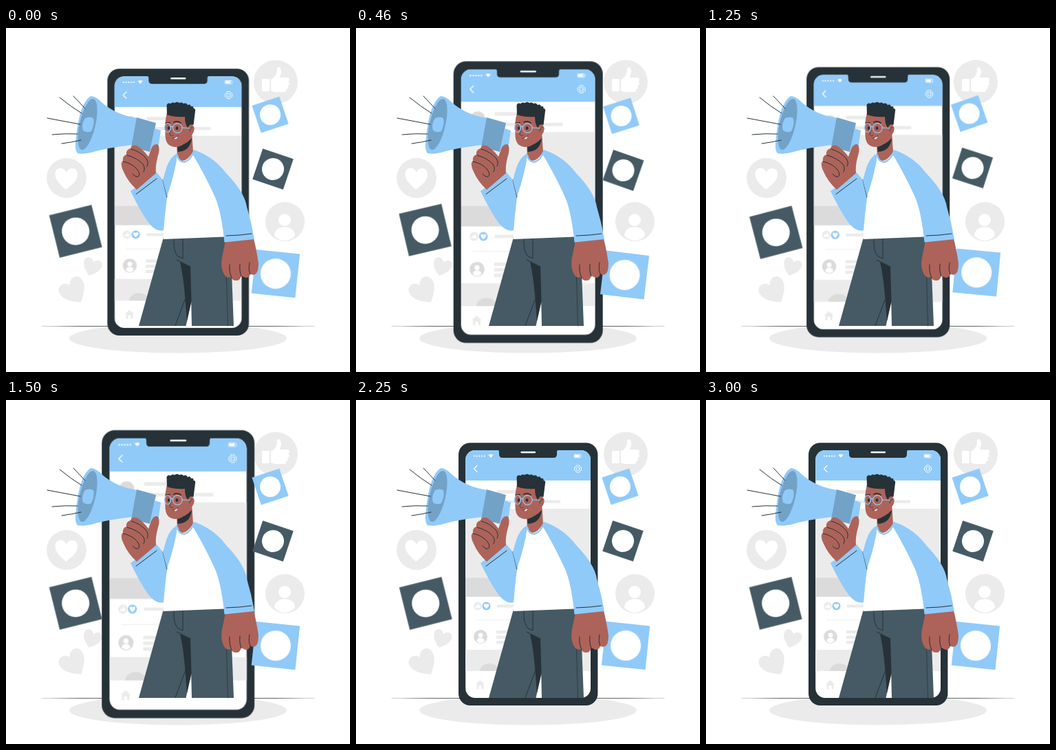
Recreate the animation shown at these times as an HTML page. Size 500 px wide and 500 px high, loop 3040 ms.

```html
<!DOCTYPE html>
<html lang="en">
<head>
<meta charset="utf-8">
<title>Social promotion</title>
<style>
  html, body { margin: 0; width: 100%; height: 100%; overflow: hidden; background: #fff; }
  svg { display: block; width: 100%; height: 100%; }
  .blue { fill: #90caf9; }
  .shade { fill: #73a2c7; }
  .slate { fill: #455a64; }
  .dark { fill: #263238; }
  .pale { fill: #ebebeb; }
  .mid { fill: #dbdbdb; }
  .white { fill: #fff; }
  .skin { fill: #ad6359; }
  .ink, .thin, .out, .trim { fill: none; stroke: #263238; stroke-linecap: round; stroke-linejoin: round; }
  .ink { stroke-width: 1; }
  .thin { stroke-width: .7; }
  .out { stroke: #fff; stroke-width: 1.3; }
  .trim { stroke: #90caf9; stroke-width: 1.2; }
  #phone { transform-origin: 250.2px 253px; animation: pulse 3040ms linear infinite; }
  #tiles { transform-origin: 244.7px 245.5px; animation: sway 3040ms linear infinite; }
  @keyframes pulse {
    0% { transform: scale(1.0157); }
    9.7% { transform: scale(1.1); }
    29.4% { transform: scale(1); }
    38.1% { transform: scale(1); }
    49% { transform: scale(1.1); }
    58.9%, 100% { transform: scale(1); }
  }
  @keyframes sway {
    0% { transform: rotate(.03deg); }
    12% { transform: rotate(1deg); }
    36.7% { transform: rotate(-1deg); }
    61.3% { transform: rotate(1deg); }
    86% { transform: rotate(-1deg); }
    100% { transform: rotate(.13deg); }
  }
</style>
</head>
<body>
<svg viewBox="0 0 500 500">
  <defs>
    <path id="heart" d="M0 10C-5 6-11 1-11-5C-11-12-3-13 0-7C3-13 11-12 11-5C11 1 5 6 0 10Z"/>
    <g id="thumb">
      <rect x="-20" y="-3" width="11" height="18" rx="1"/>
      <path d="M-7-2C-1-5 2-11 2-17C2-22 8-21 8-14C8-10 6-7 6-5H16C21-5 21 0 18 1C21 3 20 7 17 7C19 9 18 12 15 12C16 15 14 16 11 16H-2L-7 14Z"/>
    </g>
    <g id="person">
      <circle cy="-3" r="9"/>
      <path d="M-15 20C-15 3 15 3 15 20Q8 27 0 27T-15 20Z"/>
    </g>
    <clipPath id="screen"><rect x="159.2" y="73" width="181.800" height="360" rx="14"/></clipPath>
  </defs>

  <!-- backdrop -->
  <g class="pale">
    <ellipse cx="250" cy="451" rx="158" ry="21.500"/>
    <circle cx="392" cy="78.500" r="32"/>
    <circle cx="88" cy="218" r="29"/>
    <circle cx="405.500" cy="281.500" r="28.500"/>
    <use href="#heart" transform="translate(124.500 348.500) rotate(18) scale(1.22)"/>
    <use href="#heart" transform="translate(99.500 384) rotate(-33) scale(1.75)"/>
  </g>
  <g class="white">
    <use href="#thumb" transform="translate(392 77)"/>
    <use href="#heart" transform="translate(87.500 220) rotate(2) scale(1.48)"/>
    <use href="#person" x="405" y="282"/>
  </g>
  <ellipse class="dark" cx="250" cy="433.400" rx="200" ry=".45"/>

  <g id="phone">
    <rect class="dark" x="149" y="62.200" width="202.400" height="381.800" rx="17"/>
    <g clip-path="url(#screen)">
      <rect class="white" x="159" y="73" width="183" height="360"/>
      <rect class="blue" x="159" y="73" width="183" height="44"/>
      <g class="pale">
        <rect x="205" y="131" width="42" height="5"/>
        <rect x="205" y="145.500" width="92" height="4.500"/>
        <rect x="159" y="158" width="183" height="101"/>
        <rect x="205" y="297.500" width="45" height="4"/>
        <rect x="175" y="319.500" width="150" height=".8"/>
        <rect x="204" y="335" width="60" height="4.500"/>
        <rect x="204" y="342.500" width="60" height="4.500"/>
        <rect x="204" y="350" width="60" height="4.500"/>
        <rect x="159" y="363" width="183" height="31"/>
        <circle cx="177" cy="299.500" r="6"/>
        <path d="M174 413L180.500 407L187 413H185.500V420H182.500V415H178.500V420H175.500V413Z"/>
      </g>
      <g class="mid">
        <circle cx="182" cy="140" r="10"/>
        <rect x="159" y="258.500" width="183" height="27.500"/>
        <circle cx="181" cy="344" r="10"/>
        <path d="M180 394A14 11 0 0 1 208 394Z"/>
      </g>
      <circle class="blue" cx="189.500" cy="299.500" r="6"/>
      <g class="white">
        <use href="#thumb" transform="translate(177 299.500) scale(.18)"/>
        <use href="#heart" transform="translate(189.500 300) scale(.34)"/>
        <use href="#person" transform="translate(181 343) scale(.38)"/>
        <circle cx="172" cy="81.500" r="1.100"/><circle cx="175.700" cy="81.500" r="1.100"/>
        <circle cx="179.400" cy="81.500" r="1.100"/><circle cx="183.100" cy="81.500" r="1.100"/>
        <circle cx="186.800" cy="81.500" r="1.100"/>
        <path d="M192.500 80Q196 77.500 199.500 80L196 84Z"/>
        <rect x="318" y="80" width="7" height="3"/>
      </g>
      <rect class="out" x="317.200" y="79.200" width="10" height="4.600" rx="1" style="stroke-width:.8"/>
      <path class="out" d="M176 95.500L171.500 100L176 104.500"/>
      <g class="out" style="stroke-width:.9">
        <path d="M320.500 95H324.500L325.500 97L327.500 98V102L325.500 103L324.500 105H320.500L319.500 103L317.500 102V98L319.500 97Z"/>
        <circle cx="322.500" cy="100" r="2.500"/>
      </g>
    </g>
    <path class="dark" d="M204 72Q208 72 208 76V79Q208 84 213 84H287Q292 84 292 79V76Q292 72 296 72Z"/>
    <path class="out" d="M240.500 76H260" style="stroke-width:2.300"/>
  </g>

  <g id="tiles">
    <g transform="translate(384 126) rotate(-18.500)">
      <rect class="blue" x="-21" y="-21" width="42" height="42"/>
      <circle class="white" r="15"/>
    </g>
    <g transform="translate(388 205) rotate(18.500)">
      <rect class="slate" x="-23.500" y="-23.500" width="47" height="47"/>
      <circle class="white" r="16"/>
    </g>
    <g transform="translate(101.200 295.500) rotate(-14)">
      <rect class="slate" x="-31.700" y="-31.700" width="63.400" height="63.400"/>
      <circle class="white" r="20"/>
    </g>
    <g transform="translate(392 357) rotate(6)">
      <rect class="blue" x="-32" y="-32" width="64" height="64"/>
      <circle class="white" r="22"/>
    </g>
  </g>

  <!-- trousers -->
  <path class="slate" d="M229 304L193 433H261.500L269.500 397L268 347L270 433H331L328 355L318 302Z"/>
  <path class="dark" d="M253 340L268 347L269.500 397L263 426L260.500 394Q258 362 253 340Z"/>
  <path class="ink" d="M244 307Q243 325 250 332L257 335V307M248 337L268 347M260.500 394L246 432.500"/>
  <path class="thin" d="M319 306L322.500 433"/>

  <!-- far arm -->
  <path class="blue" d="M250 182Q238 188 233 204L228 221L219 210L181 237Q196 268 208 284Q219 297 229 294L240 250Z"/>
  <path class="ink" d="M189 241.500L219 219M228 221L234 246"/>

  <!-- neck and torso -->
  <path class="skin" d="M248 165L249 190Q260 199 272 180L270 150Z"/>
  <path class="dark" d="M249 171Q260 171 270 160Q268 179 249.500 180Z"/>
  <path class="white" d="M249 184Q246 210 235 241Q230 273 228.500 307L318 303.500L313 250L273 179Q270 192 259 195Q251 194 249 184Z"/>
  <path class="blue" d="M249 182Q238 188 233 204L228 222L234 245Q245 212 249 183Z"/>

  <!-- near arm -->
  <path class="skin" d="M319 309L360 306Q364 322 367 342Q367 356 362 358Q358 360 355 357Q354 363 348 363L342 360Q340 368 334 367Q329 367 327 362Q320 365 316 356Q312 348 313.500 336Z"/>
  <path class="ink" d="M325 344Q324 355 328 363M340 343Q339 354 342 361M354 341Q352 351 355 358"/>
  <path class="blue" d="M273 177Q302 187 320 211Q347 239 350 260Q357 283 361 307L317.500 311.500Q313 267 304 246Q290 215 271 183Z"/>
  <path class="ink" d="M320 302Q340 301.500 357 299"/>
  <path class="trim" d="M249 185Q251 194.500 259 195Q269 192 273 179" style="stroke-width:2.400"/>

  <!-- head -->
  <path class="skin" d="M234 123Q230 139 231.500 153Q231 169 241 172Q252 176 264 164L271 154Q276 147 271 141L267 122Z"/>
  <path class="dark" d="M234 126L233.500 112Q235 108 239 110Q242 107 245 109Q249 106 252 109Q256 107 258 110Q262 108 264 112Q268 110 269 114Q273 113 272.500 117Q276 117 275 121L272.500 141Q266 138 265 146Q260 141 260 129Q246 130 234 126Z"/>
  <path class="skin" d="M264 150Q264 140 270 140.500Q276 144 272 151Q268 156 264 153Z"/>
  <path class="thin" d="M267 150Q267 145 271 144.500M240 148L238 155Q240 158 243 156"/>
  <path class="ink" d="M232.500 138L238 137.500M244 137Q249 134.500 254 138" style="stroke-width:1.700"/>
  <ellipse class="dark" cx="236.500" cy="145.500" rx="1.700" ry="2.600"/>
  <ellipse class="dark" cx="248.500" cy="145.500" rx="1.900" ry="2.600"/>
  <path class="white" d="M244 159.500Q247 159 249 157Q249 161 246 161.500Z"/>
  <path class="thin" d="M242 160Q247 160 250 156.500"/>
  <g class="trim">
    <ellipse cx="235" cy="145" rx="4.500" ry="6.500"/>
    <circle cx="249.300" cy="145.500" r="6.800"/>
    <path d="M239.500 144Q241 142.500 242.500 144M256 145L267 145.500"/>
  </g>

  <!-- megaphone -->
  <path class="blue" d="M123 99Q130 99 138 107Q160 127 192 131L184 170Q146 174 124 181Q109 184 104 182Q99 177 102 158Q107 109 123 99Z"/>
  <ellipse class="shade" cx="118.500" cy="140" rx="11.500" ry="38" transform="rotate(13 118.500 140)"/>
  <path class="blue" d="M115 131Q122 128 127 131Q129 140 124 150Q118 153 112 149Q109 140 115 131Z"/>
  <path class="shade" d="M190 130L218 138L209 180L182 173Z"/>
  <path class="blue" d="M216 146L225 149L221 176L209 178Z"/>
  <path class="ink" d="M78 101Q95 115 110 124M98 99L115 117M60 131L108 140M67 155Q87 153 104 154M81 168Q96 166 109 163"/>

  <!-- gripping hand -->
  <path class="skin" d="M190 235L218 211Q217 201 220 189Q225 173 220 169Q214 168 211 176L207 187Q200 177 190 171Q183 169 181 175Q174 177 175 184Q169 186 170 193Q165 197 171 209Q177 223 190 235Z"/>
  <path class="ink" d="M182 176Q196 180 204 190Q208 196 205 201M176 185Q191 189 199 198Q203 204 200 209M170 194Q184 197 191 206Q196 213 192 216Q188 217 184 212"/>
</svg>
</body>
</html>
```
